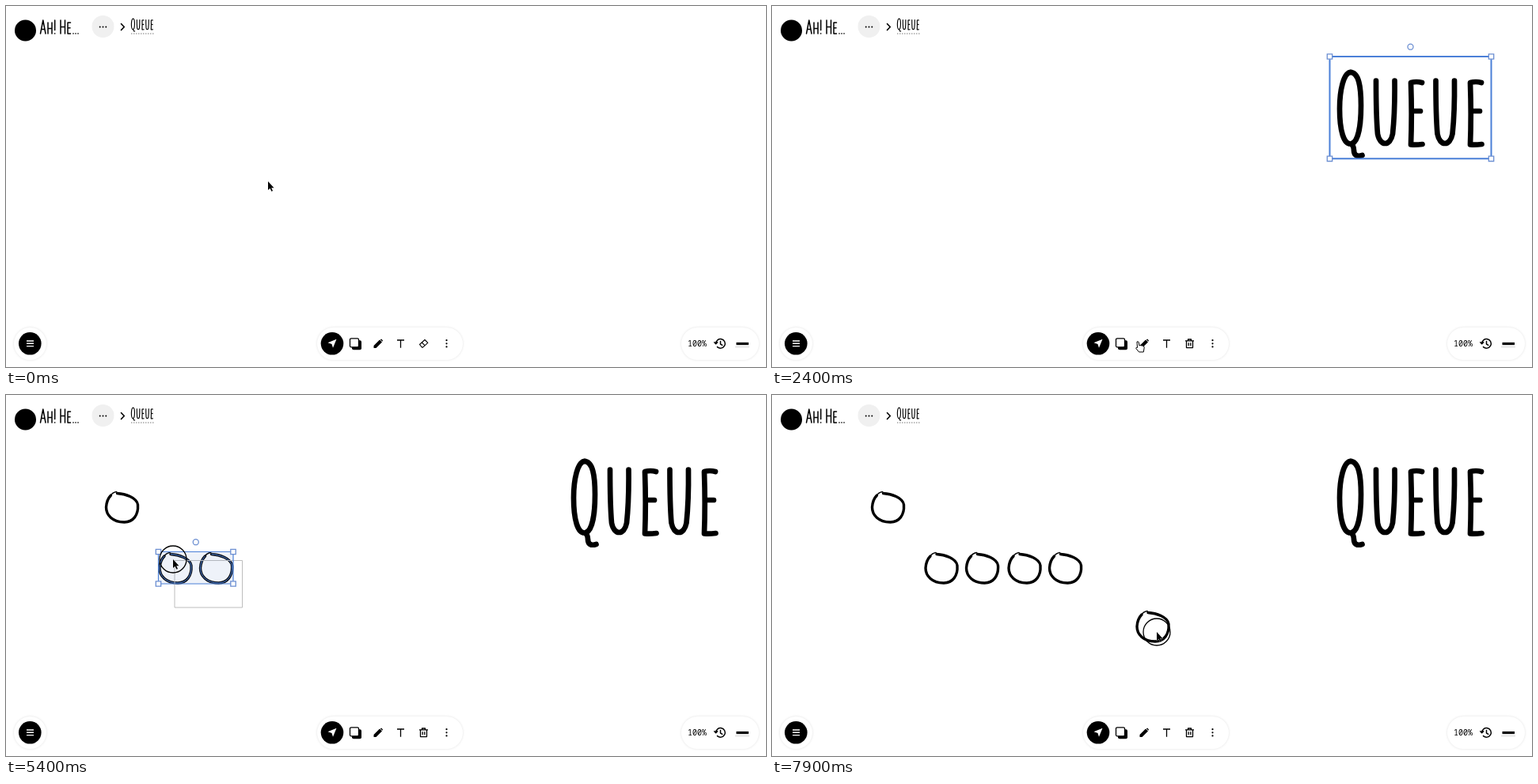
An HTML page for the animation above (8000 ms loop, 960x457 px).

```html
<!DOCTYPE html>
<html lang="en">
<head>
<meta charset="utf-8">
<title>Queue whiteboard</title>
<style>
  html, body { margin: 0; width: 100%; height: 100%; overflow: hidden; background: #fff; }
  svg { display: block; width: 960px; height: 457px; }
  .line { fill: none; stroke: #000; stroke-linecap: round; stroke-linejoin: round; }
  .pill { fill: #fff; filter: drop-shadow(0 0 1.5px rgba(0, 0, 0, .12)); }
  .icon { color: #000; fill: none; stroke: currentColor; stroke-width: 1.3; stroke-linejoin: round; }
  .icon .solid { fill: currentColor; stroke: none; }
  .icon.on { color: #fff; }
  .blue { fill: none; stroke: #4b80d8; }
  .grip { fill: #fff; stroke: #6c8fd2; stroke-width: 1.3; }
  .zoom { font: 500 10px "Noto Sans Mono", "DejaVu Sans Mono", monospace; }
</style>
</head>
<body>
<svg viewBox="0 0 960 457">
  <defs>
    <path id="loop" d="M-6-17.5C4-17 19-12 20-3C21 10 14 19 3 19C-12 19-20 10-20 0C-19.500-7-17-12-14-15"/>
    <path id="tail" d="M-14.500-14.500C-13-17-10-19-7-19.500"/>
  </defs>

  <!-- header -->
  <circle cx="24.500" cy="31" r="13.500"/>
  <path class="line" stroke-width="1.500" role="img" aria-label="Ah! He..."
    d="M43.500 35L46.800 18L50 35M44.700 29.500H49M53 21V35M58 21V35M53 28.500H58M61.700 18V30.500M61.700 34.800v.2M69 18V35M74.500 18V35M69 26.500H74.500M81.500 21H78V35H81.500M78 27.800H81M85 34.800v.2M88 34.800v.2M91 34.800v.2"/>
  <circle cx="122.500" cy="26" r="14" fill="#f0f0f0"/>
  <path class="line" stroke-width="2" d="M118.700 26.500h.01M122.500 26.500h.01M126.300 26.500h.01"/>
  <path class="line" stroke-width="1.600" d="M145.500 22.500L149.300 26.500L145.500 30.500"/>
  <g id="crumb" class="line" stroke-width="7.500" transform="translate(156.500 13) scale(.151)" role="img" aria-label="Queue"></g>
  <path d="M158 35H186.500" stroke="#777" stroke-dasharray="1.500 1.500"/>

  <!-- board -->
  <g id="heading" class="line" stroke-width="6.700" role="img" aria-label="Queue"></g>
  <g id="rings"></g>
  <path id="marquee" fill="none" stroke="#bdbdbd"/>
  <g id="selection">
    <path id="frame" class="blue"/>
    <path id="grips" class="grip"/>
    <circle id="knob" class="grip" r="3.500"/>
  </g>

  <!-- menu -->
  <rect class="pill" x="10" y="407" width="41" height="41" rx="20.500"/>
  <circle cx="30.300" cy="427.300" r="14.300"/>
  <path d="M26 424H35M26 427.300H35M26 430.600H35" stroke="#fff" stroke-width="1.400"/>

  <!-- tools -->
  <rect class="pill" x="393" y="407" width="184" height="41" rx="20.500"/>
  <circle id="active" cy="427.300" r="14.300"/>
  <g class="icon" data-tool="select" transform="translate(412 427.300)">
    <path class="solid" d="M5.500-5.500L1 5.500L-.5.800L-5.500-1Z"/>
  </g>
  <g class="icon" transform="translate(441 427.300)">
    <rect class="solid" x="-4" y="-4" width="12" height="12" rx="2"/>
    <rect x="-6.500" y="-6.500" width="11" height="11" rx="1.500" fill="#fff"/>
  </g>
  <g class="icon" data-tool="pen" transform="translate(470 427.500)">
    <path class="solid" d="M-5.500 5.500V2.500L2-5L5-2L-2.500 5.500ZM2.800-5.300L4.200-6L6-4L5.300-2.800Z"/>
  </g>
  <g class="icon" data-tool="text" transform="translate(498.500 427.300)"><path d="M-4.500-4.300H4.500M0-4.300V5.500"/></g>
  <g id="eraser" class="icon" transform="translate(527.500 427.300)">
    <path stroke-width="1.100" d="M-5 1.200L1.500-4.800L5.300-1L-1 4.800H-2ZM-2.300-1.300L1.800 2.500"/>
  </g>
  <g id="trash" class="icon" transform="translate(527.500 427.300)">
    <path d="M-5.500-3.500H5.500M-2-3.500V-5.300H2V-3.500M-4-3.500V5.300H4V-3.500M-1.300-1V3M1.300-1V3"/>
  </g>
  <path class="line" stroke-width="2.200" d="M556.500 423.200h.01M556.500 427.300h.01M556.500 431.400h.01"/>

  <!-- view -->
  <rect class="pill" x="853" y="407" width="98" height="41" rx="20.500"/>
  <text class="zoom" x="861" y="431">100%</text>
  <path class="line" stroke-width="1.500" d="M896.700 427.500A5.800 5.800 0 1 1 898.500 431.600M894.800 425.700L896.700 427.700L898.700 425.700M902.500 424.500V428L904.800 429.300"/>
  <path d="M921 431.500H939" stroke="#e4e4e4" stroke-width="2"/>
  <path d="M922.500 427.500H938" stroke="#000" stroke-width="3.200"/>

  <!-- pointer -->
  <g id="pointer">
    <circle id="press" r="17" fill="none" stroke="#000" stroke-width="1.300"/>
    <path id="arrow" d="M0 0V11L2.500 8.800L4.400 12.800L6 12L4.200 8.200H7.500Z" stroke="#fff" stroke-width=".6" paint-order="stroke"/>
    <path id="hand" d="M-1 0Q1-.8 1.300 1L2 5Q3.500 3.800 4.400 5Q6 4.300 6.500 5.600Q8.300 5.300 8.200 7.500L7.300 13H1.500L-2.200 8.500Q-2.400 6.800-.5 7.500Z" fill="#fff" stroke="#000"/>
    <path id="resize" d="M-5 0L-2-2.700V-1H2V-2.700L5 0L2 2.700V1H-2V2.700Z" stroke="#fff" stroke-width=".5"/>
  </g>
</svg>

<script>
const $ = id => document.getElementById(id);
const NS = 'http://www.w3.org/2000/svg';
const LOOP = 8000, STEP = 100;
const toolX = { select: 412, pen: 468, text: 498.5 };

const make = (tag, attrs, parent) => {
  const el = document.createElementNS(NS, tag);
  set(el, attrs);
  return parent.appendChild(el);
};
function set(el, attrs) { for (const k in attrs) el.setAttribute(k, attrs[k]); }
const show = (el, on) => { el.style.display = on ? '' : 'none'; };
const ratio = (s, t) => Math.min(1, Math.max(0, (t - s.from) / (s.to - s.from)));
const ease = u => u * u * (3 - 2 * u);
const latest = (list, t) => list.filter(e => e.time <= t).pop();

// Hand-lettered heading, drawn in its own box.
const U = x => `M${x} 30.5Q${x} 75 ${x + 2} 98C${x + 5} 114 ${x + 18} 114 ${x + 21} 98Q${x + 24} 70 ${x + 23.5} 30.5`;
const E = x => `M${x + 14} 33Q${x + 7} 31 ${x} 33Q${x + 1.500} 75 ${x} 111.500Q${x + 7} 112 ${x + 14.5} 111M${x + 1} 69H${x + 12}`;
const Q = 'M28 20C17 18 12.500 45 12.500 66C12.500 95 18 110.500 26 110.500C36 110.500 39.500 87 39.500 62C39.500 39 37 19 25 20M27 110.500Q30.500 113 30.500 119Q31 128 41 125';
for (const d of [Q, U(58.5), E(102.5), U(134), E(177.5)])
  for (const id of ['crumb', 'heading']) make('path', { d }, $(id));

// Things on the board; box is [left, top, right, bottom] around the item's place.
const heading = { x: 566, y: 154, box: [0, 0, 204, 129.3], moves: [], born: 1000 };
const rings = [];
function addRing(x, y) {
  const g = make('g', {}, $('rings'));
  const ink = (name, width, cls) =>
    make('path', { d: $(name).getAttribute('d'), class: cls, 'stroke-width': width }, g);
  const ring = {
    x, y, box: [-21.5, -20.5, 21.5, 20], moves: [], born: clock, g,
    body: ink('loop', 3.4, 'line'), tip: ink('tail', 1.7, 'line'), glow: ink('loop', 1, 'blue')
  };
  rings.push(ring);
  return ring;
}

// Storyboard: every gesture advances the clock and leaves a leg of the pointer's way.
let clock = 0, hand = [331, 222];
const legs = [], picks = [{ time: 0, items: [] }], tools = [{ time: 0, name: 'select' }];

function go(ms, x, y, extra) {
  const leg = { from: clock, to: clock + ms, a: hand, b: [x, y], ...extra };
  legs.push(leg);
  clock += ms;
  hand = [x, y];
  return leg;
}
const hold = (ms, extra) => go(ms, ...hand, extra);
const tap = () => hold(100, { down: true });
const pick = (...items) => picks.push({ time: clock, items });
const picked = () => picks[picks.length - 1].items;
function choose(name) {
  tools.push({ time: clock, name });
  tap();
}
function drag(ms, dx, dy) {
  const leg = go(ms, hand[0] + dx, hand[1] + dy, { down: true, drag: true });
  for (const item of picked()) item.moves.push({ from: leg.from, to: leg.to, dx, dy });
}
function paste() {
  pick(...picked().map(item => {
    const [x, y] = place(item, clock);
    return addRing(x + 20, y + 20);
  }));
}
function sweep(ms, x, y, ...items) {
  const extra = { down: true, corner: hand };
  go(ms, x, y, extra);
  pick(...items);
  hold(100, extra);
}

function place(item, t) {
  let { x, y } = item;
  for (const m of item.moves) {
    const u = ease(ratio(m, t));
    x += m.dx * u;
    y += m.dy * u;
  }
  return [x, y];
}

// Write the heading, enlarge it, move it to the corner.
go(500, toolX.text, 424);
choose('text');
go(400, 570, 160);
pick(heading);
tap();
tools.push({ time: clock, name: 'select' });
go(200, 684, 229);
const growth = go(200, 770, 284, { down: true, sizing: true });
go(200, 657, 237);
hold(100);
drag(300, 138.5, -90);

// Draw one ring.
go(300, 462, 425);
go(100, toolX.pen, 425);
pick();
choose('pen');
go(200, 140.5, 124.5);
const first = addRing(146.5, 142);
const stroke = go(600, 132.5, 127, { down: true });
go(200, toolX.select, 424);
choose('select');
go(300, 166, 153);

// Copy it into a row.
pick(first);
tap();
hold(200, { sizing: true });
paste();
go(100, 170, 168);
drag(300, 47.5, 57);
hold(100);
paste();
go(100, 238, 245);
drag(100, 31.5, -20);
go(100, 298.5, 269);
sweep(300, 211, 208, rings[1], rings[2]);
paste();
go(100, 240, 243);
drag(300, 89.5, -20);
go(200, 353, 283);
hold(100);
pick();
tap();

// Close the gap and bring in another ring.
go(100, 405, 262);
sweep(100, 330, 205, rings[3], rings[4]);
drag(100, -4.5, 0);
go(200, 410, 280);
pick();
tap();
go(100, 378, 224);
pick(rings[4]);
tap();
hold(100);
paste();
go(200, 395.5, 246);
drag(400, 90.5, 54);
hold(100, { down: true, drag: true });

function pointerAt(leg, t) {
  if (leg === stroke) {
    const p = $('loop').getPointAtLength($('loop').getTotalLength() * ratio(leg, t));
    return [first.x + p.x, first.y + p.y];
  }
  const u = ease(ratio(leg, t));
  return leg.a.map((v, i) => v + (leg.b[i] - v) * u);
}

function drawSelection(items, scale, tinted) {
  const boxes = t => items.map(item => {
    const p = place(item, t), s = item === heading ? scale : 1;
    return item.box.map((v, i) => p[i % 2] + v * s);
  });
  return t => {
    const all = boxes(t);
    const [l, top, r, b] = [0, 1, 2, 3].map(i => Math[i < 2 ? 'min' : 'max'](...all.map(box => box[i])));
    set($('frame'), { d: `M${l} ${top}H${r}V${b}H${l}Z`, 'stroke-width': items[0] === heading ? 2 : 1.2 });
    $('frame').style.fill = tinted ? 'rgba(90,130,190,.1)' : 'none';
    const corners = [[l, top], [r, top], [l, b], [r, b]];
    set($('grips'), { d: corners.map(([x, y]) => `M${x - 3.2} ${y - 3.2}h6.4v6.4h-6.4z`).join('') });
    set($('knob'), { cx: (l + r) / 2, cy: top - 12.3 });
  };
}

function render(t) {
  const leg = legs.find(l => t < l.to);
  const [px, py] = pointerAt(leg, t);
  const { items } = latest(picks, t);
  const { name } = latest(tools, t);
  const scale = .58 + .42 * ease(ratio(growth, t));

  set($('heading'), { transform: `translate(${place(heading, t)}) scale(${scale})` });
  [...$('heading').children].forEach((el, i) => show(el, t >= heading.born + i * 50));

  for (const ring of rings) {
    show(ring.g, t >= ring.born);
    set(ring.g, { transform: `translate(${place(ring, t)})` });
    show(ring.glow, items.includes(ring) && !leg.drag);
  }
  const drawn = ratio(stroke, t);
  set(first.body, { pathLength: 1, 'stroke-dasharray': drawn < 1 ? `${drawn} 2` : 'none' });
  show(first.tip, drawn === 1);

  show($('selection'), items.length && !leg.drag);
  if (items.length) drawSelection(items, scale, leg.corner)(t);

  show($('marquee'), leg.corner);
  if (leg.corner) set($('marquee'), { d: `M${leg.corner}H${px + 2}V${py + 1.5}H${leg.corner[0]}Z` });

  set($('active'), { cx: toolX[name] });
  document.querySelectorAll('[data-tool]').forEach(el => el.classList.toggle('on', el.dataset.tool === name));
  show($('trash'), items.length);
  show($('eraser'), !items.length);

  const over = py > 405;
  set($('pointer'), { transform: `translate(${px} ${py})` });
  show($('resize'), leg.sizing);
  show($('hand'), over);
  show($('arrow'), !leg.sizing && !over);
  show($('press'), leg.down);
}

const start = performance.now();
function tick(now) {
  const t = Math.max(0, now - start) % LOOP;
  render(Math.floor(t / STEP) * STEP);
  requestAnimationFrame(tick);
}
render(0);
requestAnimationFrame(tick);
</script>
</body>
</html>
```
